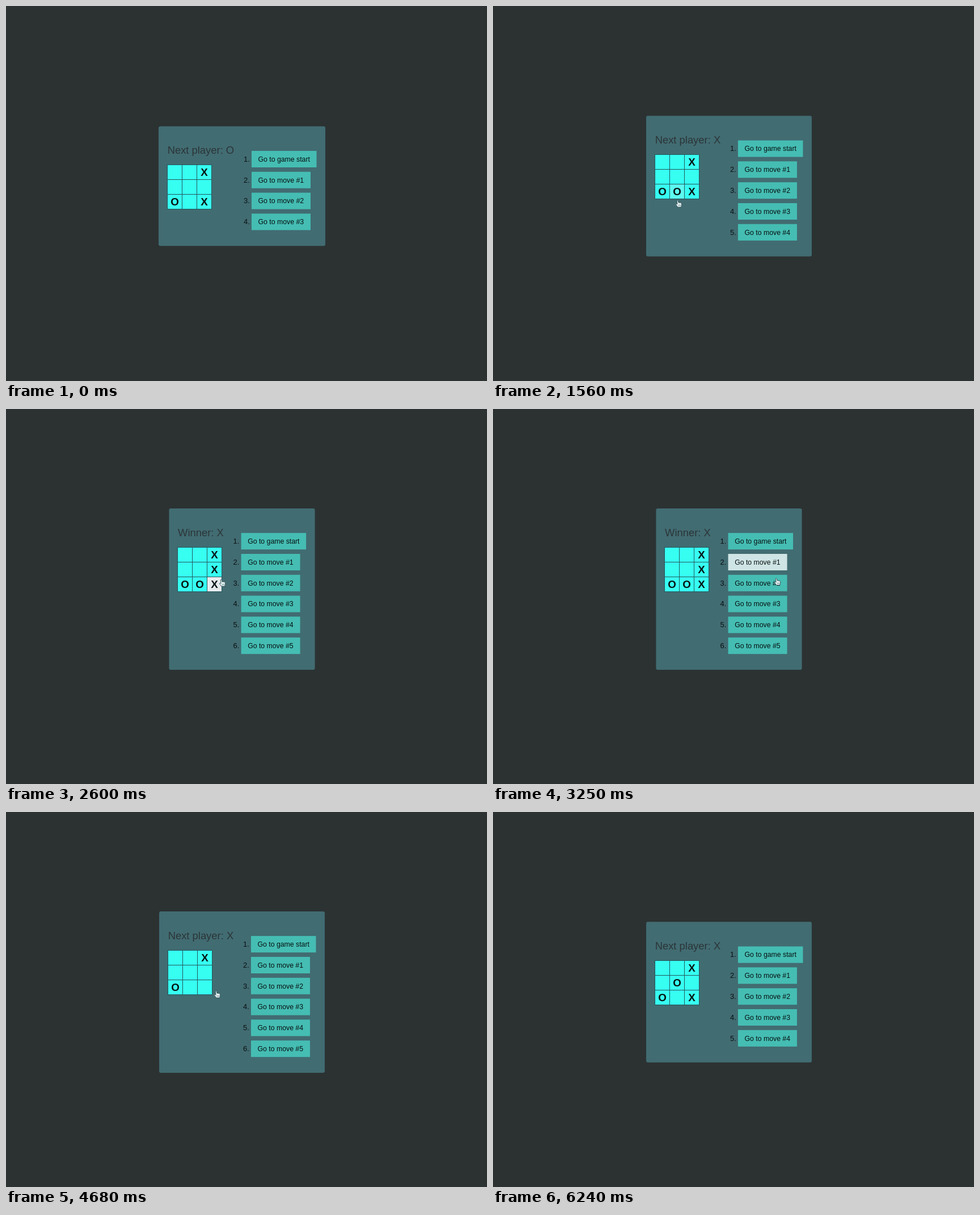
These frames come from a looping animation (848x660 px, 7150 ms). An HTML page with a canvas:

```html
<!DOCTYPE html>
<html lang="en">
<head>
<meta charset="utf-8">
<title>Tic-tac-toe</title>
<style>
  html, body { margin: 0; width: 100%; height: 100%; overflow: hidden; background: #2c3232; }
  canvas { display: block; width: 848px; height: 660px; }
</style>
</head>
<body>
<canvas id="stage" width="848" height="660"></canvas>
<script>
const ctx = document.getElementById('stage').getContext('2d');
const LOOP = 7150, TICK = 130, LAST = 48;
const FADE = 200, LAG = 20;
const FONT = '"Liberation Sans", Arial, sans-serif';
const CELL = [54, 255, 241], BUTTON = [69, 189, 179], HOVER = [232, 235, 238];

// Game states: start time, status line, board, number of history buttons
const states = [
  { at: 0, status: 'Next player: O', board: '..X...O.X', count: 4 },
  { at: 1430, status: 'Next player: X', board: '..X...OOX', count: 5 },
  { at: 2340, status: 'Winner: X', board: '..X..XOOX', count: 6 },
  { at: 3640, status: 'Next player: X', board: '..X...O..', count: 6 },
  { at: 4940, status: 'Next player: O', board: '..X...O.X', count: 4 },
  { at: 5720, status: 'Next player: X', board: '..X.O.O.X', count: 5 }
];

// Pointer path: time, x, y of the fingertip
const path = [
  [780, 300, 404], [1000, 314, 362], [1170, 318, 348], [1430, 322, 346],
  [1690, 330, 338], [2080, 352, 300], [2340, 352, 297], [2600, 380, 300],
  [2990, 440, 266], [3120, 482, 270], [3250, 500, 298], [3500, 496, 312],
  [3900, 494, 315], [4160, 486, 318], [4550, 390, 322], [4810, 352, 308],
  [4940, 351, 309], [5200, 335, 310.5], [5460, 324, 316], [5720, 323, 317],
  [5850, 312, 322], [5980, 284, 328], [6110, 266, 332]
];

function pointer(t) {
  const i = path.findIndex(p => p[0] >= t);
  if (i < 0 || t < path[0][0]) return null;
  const b = path[i], a = path[Math.max(0, i - 1)];
  const k = b === a ? 0 : (t - a[0]) / (b[0] - a[0]);
  return [a[1] + (b[1] - a[1]) * k, a[2] + (b[2] - a[2]) * k];
}

const stateAt = t => states.filter(s => s.at <= t).pop();

function layout(s) {
  ctx.font = '18.4px ' + FONT;
  const w = ctx.measureText(s.status).width + 176.4;
  const h = 63.4 + 36.8 * s.count;
  const x = 416 - w / 2, y = 317 - h / 2;
  const items = [];
  for (let i = 0; i < 9; i++) {
    items.push({
      x: Math.round(x + 16) + i % 3 * 26,
      y: Math.round(y + 68.6) + Math.floor(i / 3) * 26,
      w: 25, h: 25, mark: s.board[i]
    });
  }
  for (let i = 0; i < s.count; i++) {
    items.push({
      x: x + w - 130, y: y + 43.3 + i * 36.8,
      w: i ? 104 : 114.5, h: 29,
      num: i + 1 + '.', label: i ? 'Go to move #' + i : 'Go to game start'
    });
  }
  return { x, y, w, h, items, status: s.status };
}

states.forEach(s => s.view = layout(s));

const inside = (p, r) =>
  p && p[0] >= r.x && p[0] < r.x + r.w && p[1] >= r.y && p[1] < r.y + r.h;

// Hover strength of every cell and button, stored once per tick
function hoverTrack() {
  const level = new Array(15).fill(0), track = [];
  for (let t = 0; t <= LAST * TICK; t += 10) {
    const p = pointer(t - LAG);
    const items = stateAt(t).view.items;
    for (let i = 0; i < level.length; i++) {
      const on = items[i] && inside(p, items[i]);
      level[i] = Math.min(1, Math.max(0, level[i] + (on ? 10 : -10) / FADE));
    }
    if (t % TICK === 0) track.push(level.map(v => v * v * (3 - 2 * v)));
  }
  return track;
}

const hover = hoverTrack();

const mix = (a, b, k) =>
  'rgb(' + a.map((v, i) => Math.round(v + (b[i] - v) * k)).join(',') + ')';

function text(str, x, y, size, color, align = 'left', weight = '') {
  ctx.font = `${weight} ${size}px ${FONT}`;
  ctx.fillStyle = color;
  ctx.textAlign = align;
  ctx.fillText(str, x, y);
}

function hand(x, y) {
  ctx.save();
  ctx.translate(x, y);
  ctx.beginPath();
  ctx.moveTo(-1.8, 0.8);
  ctx.quadraticCurveTo(-0.6, -0.8, 0.4, 0.8);
  ctx.lineTo(1, 4);
  ctx.quadraticCurveTo(5, 3.6, 6.6, 5.4);
  ctx.quadraticCurveTo(7.2, 8.5, 5.6, 12);
  ctx.lineTo(-0.4, 12);
  ctx.quadraticCurveTo(-2, 9.4, -3.8, 7.2);
  ctx.quadraticCurveTo(-3.4, 5.4, -1, 7);
  ctx.closePath();
  ctx.fillStyle = '#e8f2f3';
  ctx.strokeStyle = '#32565c';
  ctx.lineWidth = 1;
  ctx.fill();
  ctx.stroke();
  ctx.beginPath();
  for (const fx of [1.2, 3, 4.8]) {
    ctx.moveTo(fx, 7.5);
    ctx.lineTo(fx, 10);
  }
  ctx.lineWidth = 0.6;
  ctx.stroke();
  ctx.restore();
}

function draw(tick) {
  const t = tick * TICK, view = stateAt(t).view;
  ctx.fillStyle = '#2c3232';
  ctx.fillRect(0, 0, 848, 660);

  ctx.fillStyle = '#416c72';
  ctx.beginPath();
  ctx.roundRect(view.x, view.y, view.w, view.h, 3);
  ctx.fill();
  text(view.status, view.x + 15.6, view.y + 48.6, 18.4, '#2c3538');

  const first = view.items[0];
  ctx.fillStyle = '#23565c';
  ctx.fillRect(first.x - 1, first.y - 1, 79, 79);

  view.items.forEach((r, i) => {
    ctx.fillStyle = mix(r.label ? BUTTON : CELL, HOVER, hover[tick][i]);
    ctx.fillRect(r.x, r.y, r.w, r.h);
    if (r.label) {
      text(r.num, r.x - 3.2, r.y + 18.8, 12.9, '#0b1011', 'right');
      text(r.label, r.x + 11.6, r.y + 18.8, 12.27, '#071010');
    } else if (r.mark !== '.') {
      text(r.mark, r.x + 12.5, r.y + 19.3, 18.8, '#061414', 'center', 'bold');
    }
  });

  const p = pointer(t);
  if (p) hand(p[0], p[1]);
}

const begin = performance.now();
function frame() {
  const t = Math.max(0, performance.now() - begin) % LOOP;
  draw(Math.min(LAST, Math.floor(t / TICK)));
  requestAnimationFrame(frame);
}
frame();
</script>
</body>
</html>
```
